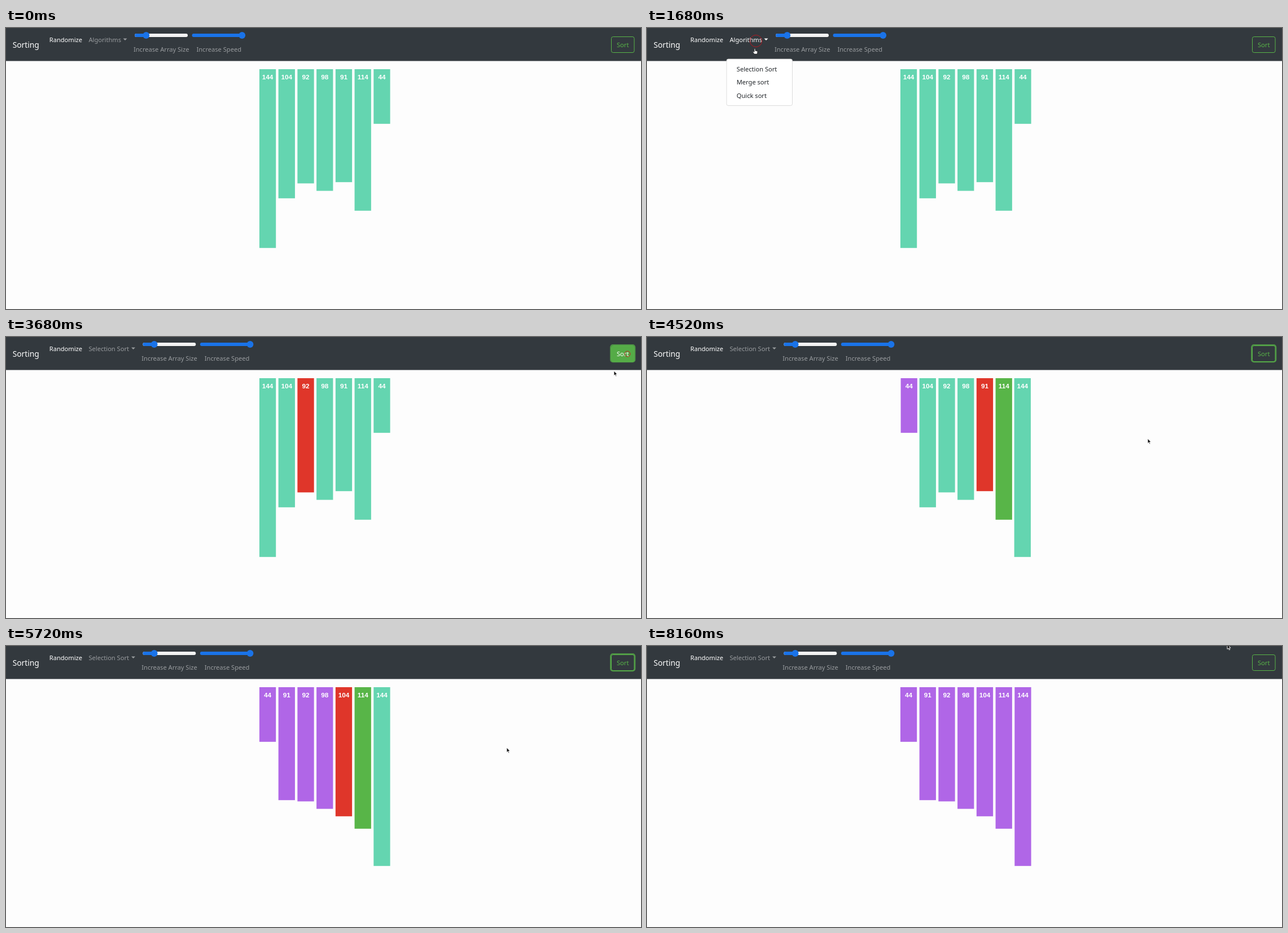
An HTML page for the animation above (8240 ms loop, 1125x498 px).

```html
<!DOCTYPE html>
<html lang="en">
<head>
<meta charset="utf-8">
<title>Sorting</title>
<style>
html, body { margin: 0; height: 100%; overflow: hidden; background: #fdfdfd; }
svg { display: block; }
text { font: 11.1px "Noto Sans", "Open Sans", sans-serif; fill: #212529; }
.brand { font-size: 13.8px; fill: #fff; }
.on { fill: #fff; }
.dim { fill: #999c9f; }
.bar text { font: bold 11.73px "Liberation Sans", Arial, sans-serif; fill: #fff; text-anchor: middle; }
</style>
</head>
<body>
<svg width="1125" height="498" viewBox="0 0 1125 498">
  <rect width="1125" height="498" fill="#fdfdfd"/>
  <rect width="1125" height="58.5" fill="#33393e"/>
  <text class="brand" x="11.7" y="34.5">Sorting</text>
  <text class="on" x="76.8" y="24.5">Randomize</text>
  <text id="label" x="146.5" y="24.5"></text>
  <path id="caret" d="M0 18.5h7l-3.5 3.6z"/>
  <g id="sliders">
    <rect x="228" y="10" width="94" height="6" rx="3" fill="#f3f3f3"/>
    <rect x="228" y="10" width="22" height="6" rx="3" fill="#1a73e8"/>
    <circle cx="248.3" cy="13" r="5.9" fill="#1a73e8"/>
    <rect x="329.5" y="10" width="94" height="6" rx="3" fill="#1a73e8"/>
    <circle cx="418.2" cy="13" r="5.9" fill="#1a73e8"/>
    <text class="dim" x="226" y="42.3">Increase Array Size</text>
    <text class="dim" x="337.5" y="42.3">Increase Speed</text>
  </g>
  <rect id="focus" x="1071.2" y="14.2" width="43" height="30" rx="4" fill="none" stroke="#58b548" stroke-opacity=".75" stroke-width="2.2"/>
  <rect id="button" x="1072.5" y="15.5" width="40.5" height="28" rx="3" fill="#58b548" stroke="#58b548"/>
  <text id="sort" x="1092.7" y="33.7" text-anchor="middle">Sort</text>
  <g id="bars"></g>
  <g id="menu">
    <rect x="141" y="55" width="116.5" height="82.5" rx="3" fill="#fff" stroke="#d4d4d4" stroke-width=".8"/>
    <rect id="hover" x="141.5" y="61.5" width="115.5" height="23.4" fill="#f5f6f7"/>
    <text x="158.8" y="77">Selection Sort</text>
    <text x="158.8" y="100.4">Merge sort</text>
    <text x="158.8" y="123.8">Quick sort</text>
  </g>
  <circle id="ring" fill="none" stroke="#c8141e" stroke-opacity=".85"/>
  <g id="cursor" stroke="#fff" stroke-width=".9" stroke-linejoin="round" fill="#111">
    <path id="arrow" d="M0 0V8.6L2 6.8L3.4 10L4.8 9.4L3.4 6.3H6z"/>
    <path id="hand" fill="#fff" stroke="#111" stroke-width=".6" d="M-.8 .5Q0-.6 .8 .5V3.6L4 4.4Q5 4.8 4.8 6L4.2 9.5H-.8L-3.2 6Q-3-.1+5-.8 6z"/>
  </g>
</svg>
<script>
const LOOP = 8240, START = 3410, STEP = 100, SWAP = 445, DONE = 6440;
const TEAL = "#64d5b0", RED = "#df362a", GREEN = "#58b548", PURPLE = "#b066e7";
const VALUES = [144, 104, 92, 98, 91, 114, 44];
const OPEN = 1600, CHOOSE = 2160, PRESS = 3410, BLUR = 6920;
// time, x, y of the pointer tip
const PATH = [
  [160, 620, -12], [1000, 230, 60], [1480, 193, 23], [1600, 193, 23], [1680, 191, 36.5],
  [2000, 188, 72], [2160, 188, 72], [2840, 944, 41], [3120, 944, 41], [3380, 1101, 30],
  [3520, 1101, 30], [3680, 1077, 60], [4000, 887, 180], [8040, 887, 180], [8160, 1028, -3]
];
const CLICKS = [[OPEN, 193, 23], [CHOOSE, 188, 72], [PRESS, 1101, 30], [BLUR, 887, 180]];

const $ = id => document.getElementById(id);
const clamp = v => Math.min(1, Math.max(0, v));
const lerp = (a, b, p) => a + (b - a) * p;
const show = (id, on) => { $(id).style.display = on ? "" : "none"; };
const set = (el, attrs) => { for (const k in attrs) el.setAttribute(k, attrs[k]); };
const move = (el, x, y = 0) => set(el, { transform: `translate(${x} ${y})` });

$("hand").setAttribute("d", "M-.9 5.6V.6Q0-.7 .9 .6V3.7L4 4.4Q5 4.8 4.8 6L4.1 9.6H-.8L-3.4 6.3Q-2.8 4.6-.9 6z");

$("bars").innerHTML = VALUES.map(v =>
  `<g class="bar"><rect y="73" width="29.3" height="${v * 2.2}"/><text x="14.7" y="91">${v}</text></g>`).join("");
const bars = [...$("bars").children];

// CSS "ease" curve
function ease(p) {
  const curve = (a, b, u) => 3 * a * u * (1 - u) ** 2 + 3 * b * u * u * (1 - u) + u ** 3;
  let lo = 0, hi = 1;
  for (let k = 0; k < 20; k++) {
    const mid = (lo + hi) / 2;
    if (curve(.25, .25, mid) < p) lo = mid; else hi = mid;
  }
  return curve(.1, 1, lo);
}

// Selection sort replayed up to time t: slot and colour of every bar
function sortAt(t) {
  const order = VALUES.map((_, i) => i), slots = [...order];
  const colors = VALUES.map(() => TEAL), n = VALUES.length;
  let clock = START;
  for (let i = 0; i < n && t >= clock; i++) {
    let min = i, scanned = null;
    const end = i === n - 1 ? DONE : clock + STEP * (n - i);
    for (let j = i + 1; j < n; j++) {
      const age = t - clock - STEP * (j - i);
      if (age < 0) break;
      const smaller = VALUES[order[j]] < VALUES[order[min]];
      if (smaller && age >= STEP / 2) min = j;
      else if (age < STEP) scanned = j;
    }
    if (t < end) {
      colors[order[min]] = RED;
      if (scanned !== null) colors[order[scanned]] = GREEN;
      break;
    }
    const a = order[i], b = order[min], p = ease(clamp((t - end) / SWAP));
    slots[a] = lerp(i, min, p);
    slots[b] = lerp(min, i, p);
    order[i] = b;
    order[min] = a;
    colors[b] = PURPLE;
    clock = end;
  }
  return { slots, colors };
}

function pointerAt(t) {
  const k = PATH.findIndex(p => p[0] > t);
  if (k < 0) return PATH[PATH.length - 1].slice(1);
  if (k === 0) return PATH[0].slice(1);
  const [t0, x0, y0] = PATH[k - 1], [t1, x1, y1] = PATH[k];
  const u = (t - t0) / (t1 - t0), p = u * u * (3 - 2 * u);
  return [lerp(x0, x1, p), lerp(y0, y1, p)];
}

function draw(t) {
  const chosen = t >= CHOOSE, open = t >= OPEN && !chosen;
  $("label").textContent = chosen ? "Selection Sort" : "Algorithms";
  const tone = open ? "#fff" : t > 1440 && !chosen ? "#ccced0" : "#999c9f";
  $("label").style.fill = tone;
  $("caret").style.fill = tone;
  move($("caret"), chosen ? 222 : 207.5);
  move($("sliders"), chosen ? 14.3 : 0);
  show("menu", open);
  show("hover", t > 1900);

  const fill = clamp((t - 3320) / 150) * (1 - clamp((t - 3670) / 150));
  set($("button"), { "fill-opacity": fill });
  $("sort").style.fill = fill > .5 ? "#fff" : GREEN;
  show("focus", t >= PRESS && t < BLUR);

  const { slots, colors } = sortAt(t);
  bars.forEach((bar, i) => {
    move(bar, 448.9 + slots[i] * 33.73);
    set(bar.firstChild, { fill: colors[i] });
  });

  const click = CLICKS.find(([at]) => t >= at && t < at + 380);
  show("ring", click);
  if (click) set($("ring"), { cx: click[1], cy: click[2], r: 13 - .03 * (t - click[0]) });

  const hand = t > 1440 && t < 2200 || t > 3340 && t < 3620;
  show("cursor", t >= 160);
  show("hand", hand);
  show("arrow", !hand);
  move($("cursor"), ...pointerAt(t));
}

const begin = performance.now();
function tick() {
  draw((performance.now() - begin) % LOOP);
  requestAnimationFrame(tick);
}
tick();
</script>
</body>
</html>
```
